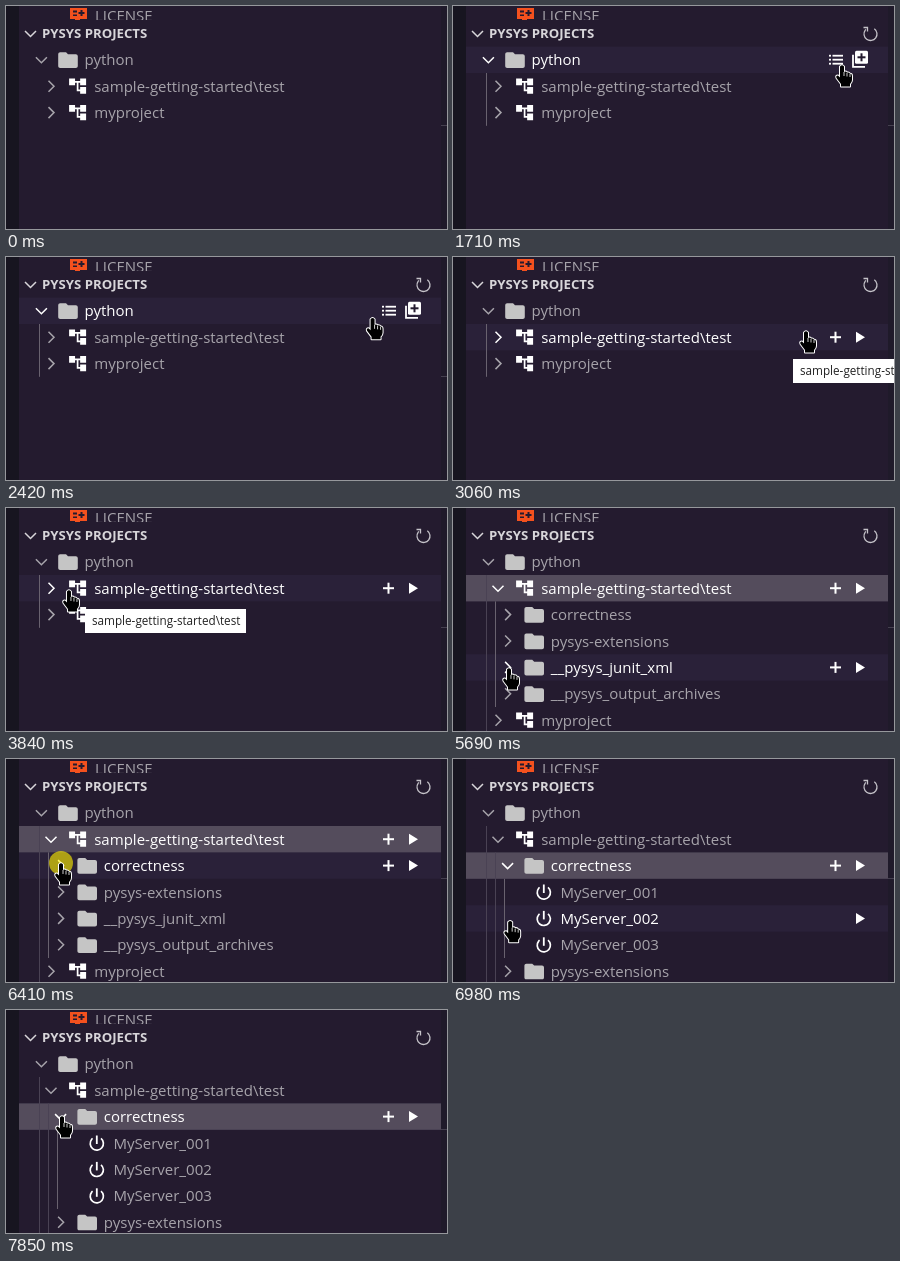
An HTML page with a canvas that plays this animation: 441x223 px, repeating every 8 s.

```html
<!DOCTYPE html>
<html lang="en">
<head>
<meta charset="utf-8">
<title>PySys projects tree</title>
<style>
  html, body { margin: 0; width: 100%; height: 100%; overflow: hidden; background: #241b2f; }
  canvas { display: block; }
</style>
</head>
<body>
<canvas id="stage" width="441" height="223"></canvas>
<script>
const ctx = document.getElementById('stage').getContext('2d');
const LOOP = 8000, ROW = 26.4, TOP = 40.6, INDENT = 9.6;
const LEFT = 13, RIGHT = 435;
const BG = '#241b2f', DIM = '#a7a4ab', WHITE = '#ffffff';
const FONT = '"Open Sans", "Noto Sans", sans-serif';

const ENTER = 920, TREE_ENTER = 1390, OPEN_TEST = 4660, OPEN_SUITE = 6570;
const CLICKS = [[4490, OPEN_TEST], [6410, OPEN_SUITE]];
const TOOLTIPS = [[2980, 3220, 340, 102], [3760, 3930, 79, 101]];

// Pointer tip: time, x, y
const PATH = [
  [920, 196, 180], [1240, 335, 132], [1389, 335, 132], [1390, 365, 100],
  [1470, 388, 46], [1560, 391, 34], [1710, 389, 59], [1790, 389, 59],
  [2140, 398, 52], [2210, 392, 50], [2600, 345, 70], [2980, 340, 76],
  [3060, 353, 74], [3140, 353, 74], [3220, 330, 79], [3760, 79, 83],
  [3840, 63, 82], [3930, 60, 82], [4090, 53, 82], [4329, 53, 82],
  [4330, 49, 81], [4660, 49, 81], [4830, 50, 92], [4970, 54, 121],
  [5050, 54, 121], [5250, 57, 176], [5450, 56, 162], [5690, 56, 160],
  [6170, 55, 104], [6570, 55, 104], [7140, 58, 184], [7290, 58, 184],
  [7850, 56, 106]
];

const FOLDER = new Path2D('M10 4H4c-1.1 0-2 .9-2 2v12c0 1.1.9 2 2 2h16c1.1 0 2-.9 2-2V8c0-1.1-.9-2-2-2h-8z');
const TREE = new Path2D('M22 11V3h-7v3H9V3H2v8h7V8h2v10h4v3h7v-8h-7v3h-2V8h2v3z');
const HAND = new Path2D('M-2 1.5Q0-1 2 1.5V7Q4 6 5 7.6Q7 7 8 8.8Q10 8.6 10 11V15Q10 17 8 19V21.5H-1V19L-5.5 13Q-6.5 10.5-4 10.5L-2 12.5Z');
const ARROW = new Path2D('M0 0V17L4 13.5L6.5 19.5L9.5 18.2L7 12.5H12Z');

function pointerAt(t) {
  let i = PATH.findIndex(p => p[0] > t);
  if (i < 0) i = PATH.length;
  const a = PATH[i - 1], b = PATH[i] || a;
  const k = b === a ? 0 : (t - a[0]) / (b[0] - a[0]);
  return { x: a[1] + (b[1] - a[1]) * k, y: a[2] + (b[2] - a[2]) * k };
}

const node = (name, depth, icon, open = null) => ({ name, depth, icon, open });

function rowsAt(t) {
  const testOpen = t >= OPEN_TEST, suiteOpen = t >= OPEN_SUITE;
  const rows = [
    node('python', 0, 'folder', true),
    node('sample-getting-started\\test', 1, 'tree', testOpen)
  ];
  if (testOpen) {
    rows.push(node('correctness', 2, 'folder', suiteOpen));
    if (suiteOpen)
      for (let n = 1; n <= 3; n++) rows.push(node('MyServer_00' + n, 3, 'power'));
    for (const name of ['pysys-extensions', '__pysys_junit_xml', '__pysys_output_archives'])
      rows.push(node(name, 2, 'folder', false));
  }
  rows.push(node('myproject', 1, 'tree', false));
  return rows;
}

function text(s, x, y, size, color, weight = 400) {
  ctx.font = `${weight} ${size}px ${FONT}`;
  ctx.fillStyle = color;
  ctx.fillText(s, x, y);
}

function rect(x, y, w, h, color) {
  ctx.fillStyle = color;
  ctx.fillRect(x, y, w, h);
}

function line(points, color, width) {
  ctx.beginPath();
  points.forEach(([x, y]) => ctx.lineTo(x, y));
  ctx.strokeStyle = color;
  ctx.lineWidth = width;
  ctx.stroke();
}

function shape(path, x, y, scale, color) {
  ctx.save();
  ctx.translate(x, y);
  ctx.scale(scale, scale);
  ctx.translate(-12, -12);
  ctx.fillStyle = color;
  ctx.fill(path);
  ctx.restore();
}

function chevron(x, y, open, color) {
  const pts = open
    ? [[x - 5.5, y - 2.5], [x, y + 3], [x + 5.5, y - 2.5]]
    : [[x - 2.5, y - 5.5], [x + 3, y], [x - 2.5, y + 5.5]];
  line(pts, color, 1.5);
}

function power(x, y) {
  ctx.beginPath();
  ctx.arc(x, y, 6.6, -Math.PI * 0.28, Math.PI * 1.28);
  ctx.strokeStyle = WHITE;
  ctx.lineWidth = 1.7;
  ctx.stroke();
  rect(x - 0.9, y - 8, 1.8, 8.5, WHITE);
}

function plus(x, y, size, color) {
  rect(x - size / 2, y - 1, size, 2, color);
  rect(x - 1, y - size / 2, 2, size, color);
}

function play(x, y) {
  ctx.beginPath();
  ctx.moveTo(x - 4, y - 5.5);
  ctx.lineTo(x + 5, y);
  ctx.lineTo(x - 4, y + 5.5);
  ctx.fillStyle = WHITE;
  ctx.fill();
}

function projectActions(y) {
  for (const dy of [-4, 0, 4]) {
    rect(376, y + dy - 1, 2, 1.8, WHITE);
    rect(379.5, y + dy - 1, 10.5, 1.8, WHITE);
  }
  line([[400, y - 5], [400, y + 7], [412, y + 7]], WHITE, 1.8);
  ctx.beginPath();
  ctx.roundRect(402, y - 9, 13, 13, 1.5);
  ctx.fillStyle = WHITE;
  ctx.fill();
  plus(408.5, y - 2.5, 8, BG);
}

function refresh(x, y) {
  ctx.beginPath();
  ctx.arc(x, y, 6.5, -Math.PI * 0.3, Math.PI * 1.25);
  ctx.strokeStyle = '#c5c3c9';
  ctx.lineWidth = 1.3;
  ctx.stroke();
  line([[x - 7, y - 6.5], [x - 3, y - 6.5], [x - 3, y - 2.5]], '#c5c3c9', 1.3);
}

function frameParts(t) {
  rect(0, 0, 441, 223, BG);
  rect(0, 0, LEFT, 223, '#171520');
  rect(RIGHT, 0, 6, 223, '#1f1a2a');
  rect(RIGHT, 119, 6, 1, '#45404f');

  ctx.save();
  ctx.beginPath();
  ctx.rect(LEFT, 0, RIGHT - LEFT, 14);
  ctx.clip();
  rect(64, 2, 17, 11, '#f4511e');
  rect(67, 4.5, 4, 2, BG);
  rect(67, 8.5, 4, 1.5, BG);
  plus(75.5, 7, 6, BG);
  rect(69, 13, 5, 1, '#f4511e');
  text('LICENSE', 89, 14.5, 15, DIM);
  ctx.restore();

  chevron(24.5, 27.5, true, '#d8d6da');
  text('PYSYS PROJECTS', 36, 32, 13.2, '#d8d6da', 700);
  if (t >= ENTER) refresh(417.5, 28);
}

function guides(rows) {
  for (let d = 0; d < 3; d++) {
    const first = rows.findIndex(r => r.depth === d && r.open);
    if (first < 0) continue;
    let end = first + 1;
    while (end < rows.length && rows[end].depth > d) end++;
    const y = TOP + ROW * (first + 1);
    const active = d === Math.max(...rows.filter(r => r.open).map(r => r.depth));
    rect(Math.round(32.6 + d * INDENT * 0.95), y, 1, ROW * (end - first - 1), active ? '#69626f' : '#4a4254');
  }
}

function drawRow(row, y, hovered, selected) {
  const lit = hovered || selected, shift = row.depth * INDENT;
  const color = lit ? WHITE : DIM;
  if (row.open !== null) chevron(35.4 + shift, y, row.open, color);
  const ix = 62 + shift;
  if (row.icon === 'folder') shape(FOLDER, ix, y + 0.3, 0.98, '#c5c5c5');
  else if (row.icon === 'tree') shape(TREE, ix, y, 0.85, WHITE);
  else power(ix, y + 0.5);
  text(row.name, 78.6 + shift, y + 5.5, 15, color);
  if (!lit) return;
  if (row.depth === 0) projectActions(y);
  else {
    if (row.icon !== 'power') plus(382.5, y, 11, WHITE);
    play(407, y);
  }
}

function tooltip(x, y) {
  rect(x, y, 161, 24, WHITE);
  text('sample-getting-started\\test', x + 7, y + 16, 11.7, '#222222');
}

function pointer(p, path) {
  ctx.save();
  ctx.translate(p.x, p.y);
  ctx.lineJoin = 'round';
  ctx.strokeStyle = WHITE;
  ctx.lineWidth = 2;
  ctx.stroke(path);
  ctx.fillStyle = '#000000';
  ctx.fill(path);
  if (path === HAND) {
    line([[2, 7], [2, 11]], WHITE, 0.8);
    line([[5, 8], [5, 11.5]], WHITE, 0.8);
    line([[8, 9], [8, 12]], WHITE, 0.8);
  }
  ctx.restore();
}

function draw(t) {
  const rows = rowsAt(t);
  const tip = t >= ENTER ? pointerAt(t) : null;
  const hover = tip && t >= TREE_ENTER ? Math.floor((tip.y - TOP) / ROW) : -1;
  const selected = t >= OPEN_SUITE ? 2 : t >= OPEN_TEST ? 1 : -1;
  const band = (i, color) => rect(LEFT, TOP + i * ROW, RIGHT - LEFT, ROW, color);

  frameParts(t);
  if (hover >= 0 && hover < rows.length) band(hover, '#2a2139');
  if (selected >= 0) band(selected, '#544c5c');
  if (t >= TREE_ENTER) guides(rows);
  rows.forEach((row, i) => drawRow(row, TOP + (i + 0.5) * ROW, i === hover, i === selected));

  for (const [from, to, x, y] of TOOLTIPS) if (t >= from && t < to) tooltip(x, y);
  if (!tip) return;
  if (CLICKS.some(([from, to]) => t >= from && t < to)) {
    ctx.beginPath();
    ctx.arc(tip.x, tip.y, 12, 0, Math.PI * 2);
    ctx.fillStyle = 'rgba(255, 240, 0, 0.62)';
    ctx.fill();
  }
  pointer(tip, hover >= rows.length || t < TREE_ENTER ? ARROW : HAND);
}

function tick(now) {
  draw(now % LOOP);
  requestAnimationFrame(tick);
}
requestAnimationFrame(tick);
</script>
</body>
</html>
```
